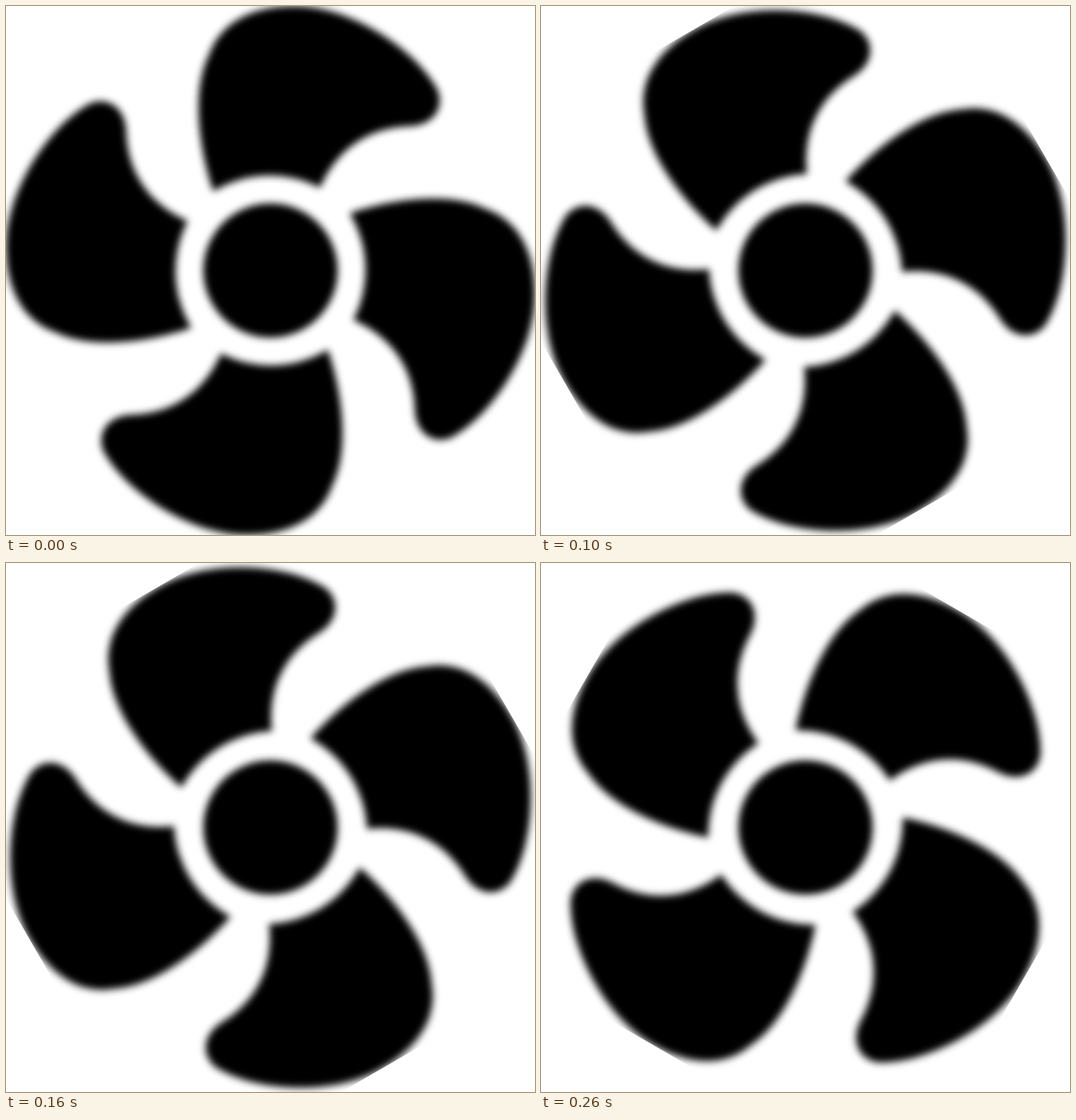
These frames come from a looping animation (748x748 px, 300 ms). An HTML page:

```html
<!DOCTYPE html>
<html lang="en">
<head>
<meta charset="utf-8">
<title>Spinning fan</title>
<style>
  html, body {
    margin: 0;
    width: 100%;
    height: 100%;
    overflow: hidden;
    background: #fff;
  }
  /* The square viewport turns with the fan, so its edges trim the blades. */
  .fan {
    display: block;
    width: 100%;
    height: 100%;
    overflow: hidden;
    animation: spin 300ms steps(3) infinite;
  }
  /* Four-fold symmetry: a quarter turn closes the loop. */
  @keyframes spin {
    to { transform: rotate(-90deg); }
  }
</style>
</head>
<body>
<svg class="fan" viewBox="-374 -374 748 748">
  <defs>
    <filter id="soft" color-interpolation-filters="sRGB">
      <feGaussianBlur stdDeviation="5.5"/>
    </filter>
    <path id="blade" d="M-81 -112
      C-99 -165 -114 -250 -87 -305
      C-70 -352 -25 -374 35 -374
      C112 -374 205 -314 236 -256
      C247 -230 230 -205 196 -204
      C135 -202 92 -168 70 -117
      A155 155 0 0 0 -81 -112Z"/>
  </defs>
  <g filter="url(#soft)">
    <circle r="95"/>
    <use href="#blade"/>
    <use href="#blade" transform="rotate(90)"/>
    <use href="#blade" transform="rotate(180)"/>
    <use href="#blade" transform="rotate(270)"/>
  </g>
</svg>
</body>
</html>
```
